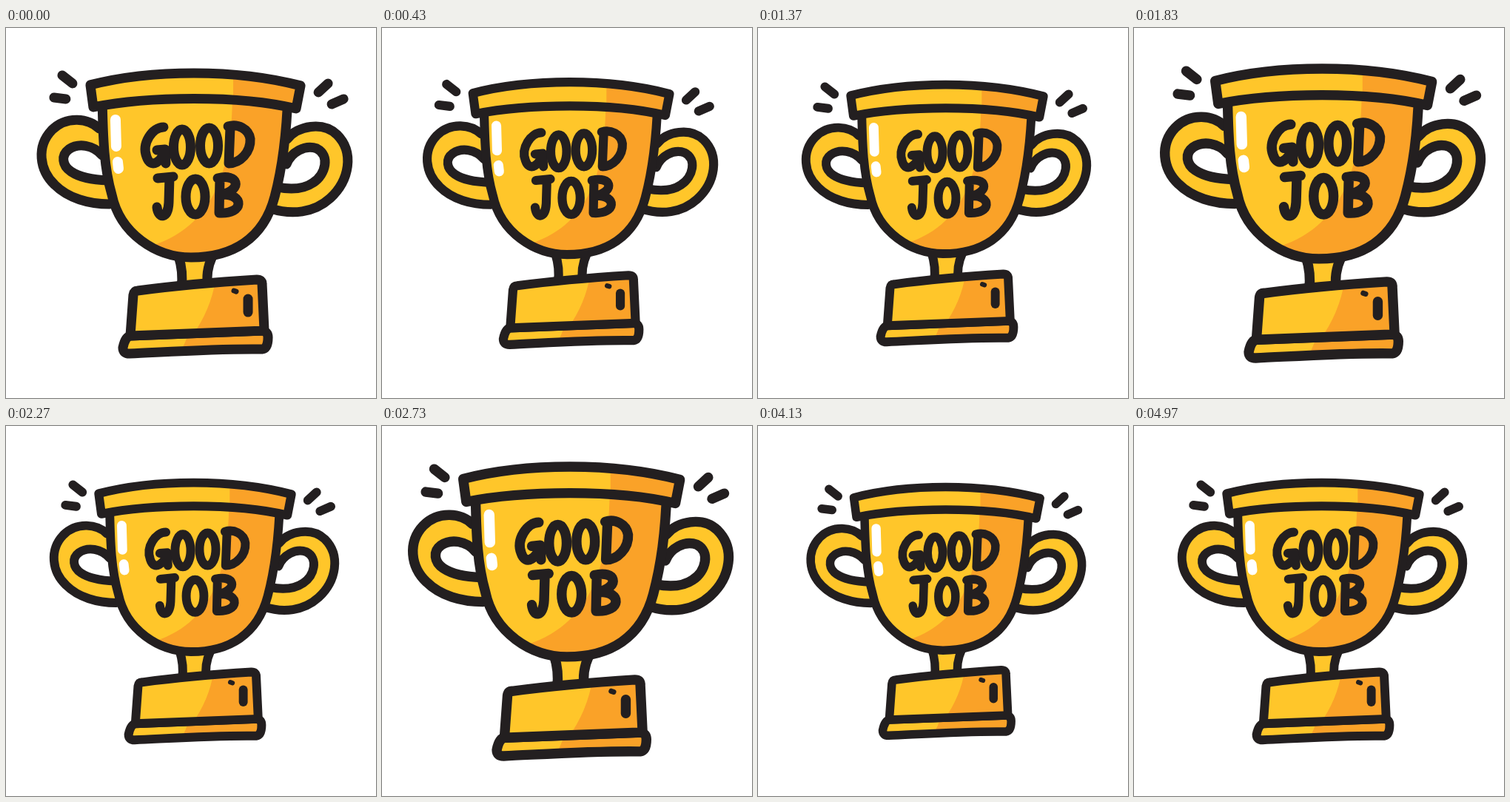
An HTML page for the animation above (5010 ms loop, 500 by 500 pixels).

```html
<!DOCTYPE html>
<html lang="en">
<head>
<meta charset="utf-8">
<title>Good job</title>
<style>
  html, body { margin: 0; width: 100%; height: 100%; overflow: hidden; background: #fff; }
  svg { display: block; width: 100vw; height: 100vh; }
  .ink { fill: none; stroke: #231f20; stroke-width: 13; stroke-linecap: round; stroke-linejoin: round; }
  .dot { stroke-width: 7; }
  .gold { fill: #ffc62a; }
  .amber { fill: #faa228; }
  .shine { fill: none; stroke: #fff; stroke-width: 14; stroke-linecap: round; }
</style>
</head>
<body>
<svg viewBox="0 0 500 500" role="img" aria-label="Good job trophy">
  <defs>
    <path id="rim" d="M114 77C160 65 205 61 254 61S352 66 398 78L392 109C350 99 302 95.5 254 95.5S163 98 118 107Z"/>
    <path id="cup" d="M130 88C131 155 133 190 143 225C154 278 203 310 250 310C306 310 348 285 363 228C373 190 379 150 381 88Z"/>
    <path id="stem" d="M233 308Q240 330 237 350H273Q269 330 279 308Z"/>
    <path id="block" d="M178 355C230 348 290 343 339 340Q346 340 346 346L349 409L168 416L172 361Q173 355 178 355Z"/>
    <path id="plinth" d="M168 416L346 409Q354 410 354 418Q354 433 346 434C290 433 230 437 167 440Q158 440 158 432Q161 417 168 416Z"/>
    <path id="leftHandle" d="M126 136C112 122 82 118 62 138C41 160 45 192 66 212C84 230 112 238 140 238"/>
    <path id="leftHole" d="M130 172C118 158 98 155 85 164C74 172 76 186 88 194C100 202 115 205 138 206"/>
    <path id="rightHandle" d="M380 150C394 132 428 126 447 144C471 168 464 206 438 230C416 250 386 253 358 244"/>
    <path id="rightHole" d="M379 184C385 168 404 157 420 163C438 172 432 198 415 209C402 218 386 219 366 215"/>
    <clipPath id="inRim"><use href="#rim"/></clipPath>
    <clipPath id="inCup"><use href="#cup"/></clipPath>
    <clipPath id="inBlock"><use href="#block"/></clipPath>
    <clipPath id="inPlinth"><use href="#plinth"/></clipPath>
  </defs>
  <g id="trophy">
    <use href="#leftHandle" class="gold"/>
    <use href="#rightHandle" class="gold"/>
    <use href="#leftHole" fill="#fff"/>
    <use href="#rightHole" fill="#fff"/>
    <g class="ink">
      <use href="#leftHandle"/><use href="#leftHole"/>
      <use href="#rightHandle"/><use href="#rightHole"/>
    </g>

    <use href="#stem" class="gold"/>
    <use href="#stem" class="ink"/>

    <use href="#plinth" class="gold"/>
    <path class="amber" clip-path="url(#inPlinth)" d="M250 400Q245 422 232 445H370V400Z"/>
    <use href="#plinth" class="ink"/>
    <use href="#block" class="gold"/>
    <path class="amber" clip-path="url(#inBlock)" d="M284 335Q278 380 250 418H370V335Z"/>
    <use href="#block" class="ink"/>
    <path class="ink" d="M327 366V384"/>
    <path class="ink dot" d="M308 355L311 356"/>

    <use href="#cup" class="gold"/>
    <path class="amber" clip-path="url(#inCup)" d="M306 85C306 175 290 264 198 294L250 320H400V85Z"/>
    <use href="#cup" class="ink"/>
    <path class="shine" d="M148 124L149 160M151 181L152 190"/>

    <use href="#rim" class="gold"/>
    <path class="amber" clip-path="url(#inRim)" d="M307 50V115H410V50Z"/>
    <use href="#rim" class="ink"/>

    <g class="ink">
      <path d="M213 134C198 134 183 156 190 174C196 192 211 180 215 164L204 165M215 164L216 183"/>
      <ellipse cx="238" cy="161" rx="11.5" ry="24"/>
      <ellipse cx="274.5" cy="159" rx="12" ry="24"/>
      <path d="M303 134L301 183C316 183 331 168 330 150C328 136 313 129 300 133"/>
      <path d="M205 203L226 201M221 202L220 236C219 258 206 259 204 242"/>
      <ellipse cx="256" cy="228" rx="13" ry="24"/>
      <path d="M289 203L288 250M286 203C314 196 320 218 292 225C322 224 322 252 288 250"/>
    </g>
    <path class="ink" d="M76 64L90 75M65 94L81 96M422 87L435 75M440 103L456 96"/>
  </g>
</svg>
<script>
  const LOOP = 5010, FRAMES = 150, BEAT = 27;
  const PEAK = 1.14, LOW = 0.86, PEAK_AT = 5, LOW_AT = 19, RISE_END = 31;
  const trophy = document.getElementById('trophy');

  // Shrinks with a soft landing, then swells faster and holds the peak for one frame.
  function pulse(frame) {
    let phase = frame % BEAT;
    if (phase < PEAK_AT) phase += BEAT;
    const level = phase <= LOW_AT
      ? ((LOW_AT - phase) / (LOW_AT - PEAK_AT)) ** 1.54
      : ((phase - LOW_AT) / (RISE_END - LOW_AT)) ** 1.7;
    return LOW + (PEAK - LOW) * level;
  }

  function draw(ms) {
    const frame = Math.min(FRAMES - 1, Math.floor((ms % LOOP + 4) * 0.03));
    trophy.setAttribute('transform',
      `translate(250 250) scale(${pulse(frame).toFixed(4)}) translate(-250 -250)`);
  }

  let start;
  function tick(now) {
    start ??= now;
    draw(now - start);
    requestAnimationFrame(tick);
  }
  draw(0);
  requestAnimationFrame(tick);
</script>
</body>
</html>
```
